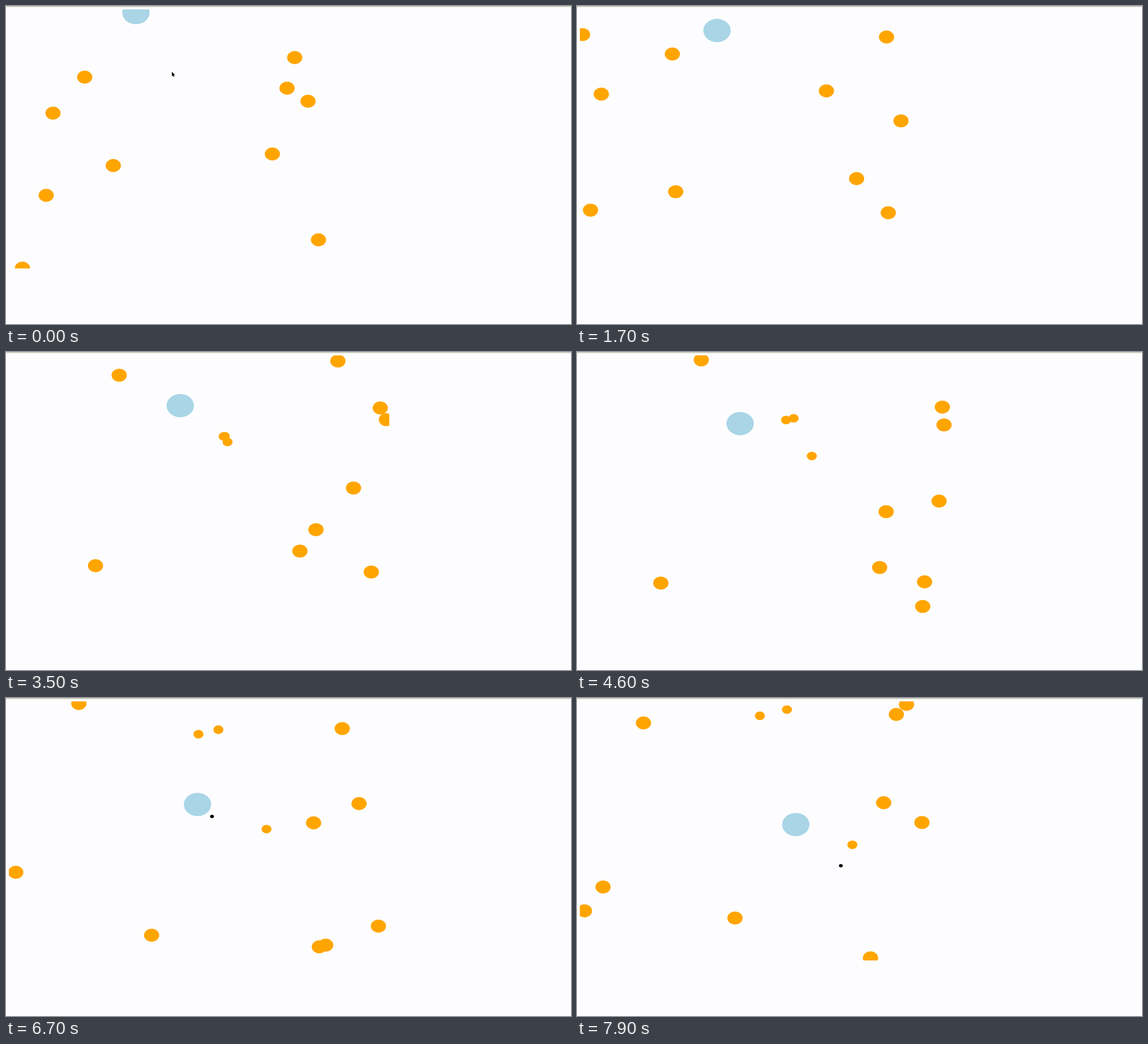
An HTML page with a canvas for the animation above (8 s loop, 998 by 561 pixels).

```html
<!DOCTYPE html>
<html lang="en">
<head>
<meta charset="utf-8">
<title>Space rocks</title>
<style>
  html, body { margin: 0; width: 100%; height: 100%; overflow: hidden; background: #fdfdff; }
  canvas { display: block; width: 998px; height: 561px; }
</style>
</head>
<body>
<canvas id="stage" width="998" height="561"></canvas>
<script>
const ctx = document.getElementById('stage').getContext('2d');
const LOOP = 8000, STEP = 100, END = 7.9;
const field = { x: 5, y: 6, w: 672, h: 457 };
const unit = { x: 1.344, y: 1.1425 };  // the playing field is stretched
const SPEED = 25.25, BULLET_SPEED = 87.3;
const HIT = 3.3, SHOTS = [1.8, 6.2];
const LAUNCH = 0.58;
const ORANGE = '#ffa500';

// Start x, y and heading in degrees; every rock has the same speed.
const rocks = [
  [510, 91, -49.2], [533.5, 168, 46.5], [470.5, 261, 65.4],
  [552, 412.5, -92.2], [139, 125.5, -58.5], [83, 189, -135.4],
  [189.5, 281.5, 105.6], [71, 334, 146.9], [29, 462.5, 110]
];
const target = [496.5, 145, 174.3];
const fragmentHeadings = [-113.9, -95.9, 51.1];

// Times and places where the ship changes its sideways course.
const turns = [[0, 229.5], [1.17, 229.5], [3.76, 316.5], [4.9, 278], [6.7, 338.3], [END, 386.5]];

// Game clock: starts a little slow and catches up by END.
const clock = t => t - 0.004 * t * (END - t);

const wrap = (v, start, size) => start + (((v - start) % size) + size) % size;

function travel([x, y, heading], time, speed = SPEED) {
  const a = heading * Math.PI / 180;
  return [x + Math.cos(a) * speed * time * unit.x, y + Math.sin(a) * speed * time * unit.y];
}

function shipAt(t) {
  const i = Math.max(1, turns.findIndex(p => p[0] >= t));
  const [t0, x0] = turns[i - 1], [t1, x1] = turns[i];
  const fall = Math.max(0, clock(t) - clock(LAUNCH));
  return [x0 + (x1 - x0) * (t - t0) / (t1 - t0), 11.6 + fall * SPEED * unit.y];
}

function ball([x, y], r, color) {
  ctx.fillStyle = color;
  ctx.beginPath();
  ctx.ellipse(wrap(x, field.x, field.w), wrap(y, field.y, field.h),
    r * unit.x, r * unit.y, 0, 0, Math.PI * 2);
  ctx.fill();
}

function drawCursor(x, y) {
  ctx.fillStyle = '#000';
  ctx.fill(new Path2D(`M${x} ${y}v8l1.8 -1.4 1.2 2.6 1.4 -.6 -1.2 -2.6 2.2 -.4z`));
}

function draw(t) {
  const now = clock(t);
  ctx.fillStyle = '#fdfdff';
  ctx.fillRect(0, 0, 998, 561);
  ctx.fillStyle = '#cdcec2';
  ctx.fillRect(0, 0, 998, 2);

  ctx.save();
  ctx.beginPath();
  ctx.rect(field.x, field.y, field.w, field.h);
  ctx.clip();
  ball(shipAt(t), 18, '#a9d5e7');
  for (const rock of rocks) ball(travel(rock, now), 10, ORANGE);

  if (t < HIT) {
    ball(travel(target, now), 10, ORANGE);
  } else {
    const crash = travel(target, clock(HIT));
    for (const heading of fragmentHeadings)
      ball(travel([...crash, heading], now - clock(HIT)), 6.6, ORANGE);
  }

  for (const shot of SHOTS) {
    const gone = shot < HIT && t >= HIT;
    if (t >= shot && !gone)
      ball(travel([...shipAt(shot), 45], now - clock(shot), BULLET_SPEED), 2.5, '#000');
  }
  ctx.restore();

  if (t < LAUNCH) drawCursor(293, 116);
}

const start = performance.now();
function tick() {
  const ms = (performance.now() - start) % LOOP;
  draw(Math.floor(ms / STEP) * STEP / 1000);
  requestAnimationFrame(tick);
}
tick();
</script>
</body>
</html>
```
